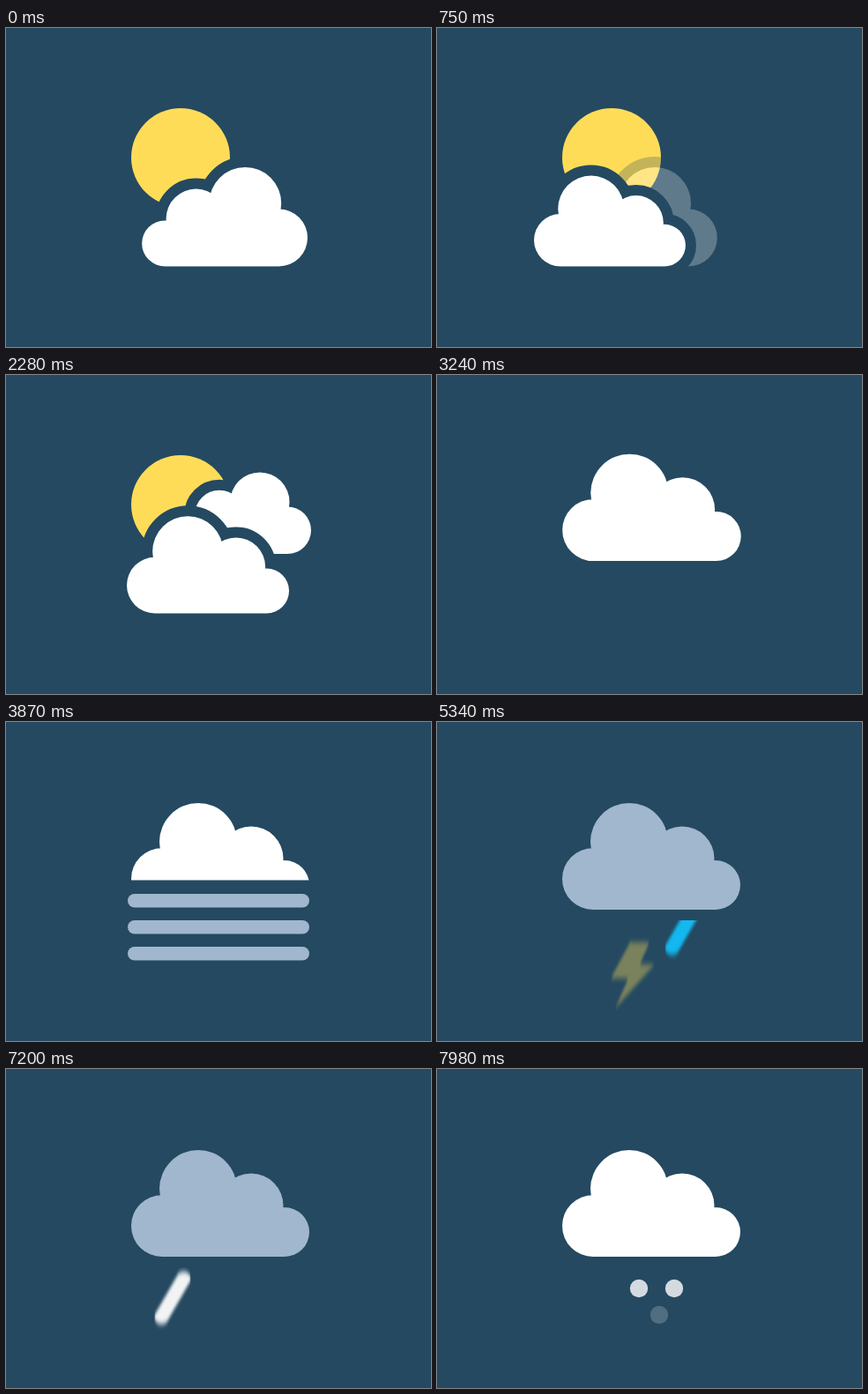
Write an HTML page that moves like this. It is 482x362 px and loops after 8000 ms.

```html
<!DOCTYPE html>
<html lang="en">
<head>
<meta charset="utf-8">
<title>Weather icons</title>
<style>
  html, body { margin: 0; width: 100%; height: 100%; overflow: hidden; background: #244961; }
  svg { display: block; width: 482px; height: 362px; }
  .cloud { fill: #fff; stroke: #244961; stroke-width: 24; paint-order: stroke; vector-effect: non-scaling-stroke; }
</style>
</head>
<body>
<svg id="stage" viewBox="0 0 482 362">
  <filter id="smear" filterUnits="userSpaceOnUse" x="-60" y="-90" width="600" height="540" color-interpolation-filters="sRGB">
    <feGaussianBlur stdDeviation="0 3"/>
  </filter>
</svg>
<script>
const LOOP = 8000;
const BG = '#244961', SUN = '#ffdc58', RAIN = '#14b8f0', FOG = '#a0b7cd';
const stage = document.getElementById('stage');

function set(el, attrs) {
  for (const k in attrs) el.setAttribute(k, attrs[k]);
  return el;
}
function add(tag, attrs) {
  return stage.appendChild(set(document.createElementNS('http://www.w3.org/2000/svg', tag), attrs));
}

// The cloud's origin is its lower left corner; it is 202 wide.
const puff = (x, y, r) => `M${x - r} ${y}a${r} ${r} 0 0 1 ${2 * r} 0a${r} ${r} 0 0 1 ${-2 * r} 0z`;
const CLOUD = puff(35, -35, 35) + puff(76, -77, 44) + puff(136, -58, 36.5) +
  puff(174, -28, 28) + 'M35-53H174V0H35z';
const addCloud = () => add('path', { d: CLOUD, class: 'cloud' });

// Drawing order, back to front
const sun = add('circle', { cx: 198, cy: 147, fill: SUN });
const first = addCloud();
const back = addCloud();
const bolt = add('path', { d: 'M219 231H241L230 256H247L202 306L217 272H197z', fill: SUN });

// Three slanted strokes per shower, entering from right to left
const shower = (color, start, gap, out, outGap, outTime) => [0, 1, 2].map(i => ({
  el: add('path', {
    d: `M${278.5 - 38 * i} 236l-25 43.5`, stroke: color, 'stroke-width': 16, 'stroke-linecap': 'round'
  }),
  start: start + gap * i, out: out + outGap * i, outTime
}));
const drops = [
  ...shower(RAIN, 5290, 220, 5940, 60, 180),
  ...shower('#fff', 6060, 120, 6630, 250, 280)
];

const front = addCloud();
const cover = add('rect', { x: 130, width: 225, fill: BG });
const bars = [0, 1, 2].map(i => add('rect', { x: 138, y: 195 + 30 * i, height: 15.5, rx: 7.75, fill: FOG }));
const flakes = [[229, 249, 7620], [269, 249, 7620], [252, 279, 7890]].map(([cx, cy, start]) =>
  ({ el: add('circle', { cx, cy, r: 10.2, fill: '#fff' }), start }));

const part = (t, start, time) => Math.min(1, Math.max(0, (t - start) / time));
const mix = (a, b, p) => a + (b - a) * p;
const easeIn = p => p * p;
const easeOut = p => 1 - (1 - p) ** 3;
const smooth = p => p * p * (3 - 2 * p);
const backOut = p => 1 + 3.2 * (p - 1) ** 3 + 2.2 * (p - 1) ** 2;

function place(el, x, y, scale, flip, opacity) {
  set(el, { transform: `translate(${x} ${y}) scale(${flip ? -scale : scale} ${scale})`, opacity });
}
function move(el, x, y, opacity, blurred) {
  set(el, { transform: `translate(${x} ${y})`, opacity, filter: blurred ? 'url(#smear)' : 'none' });
}

function drawClouds(t) {
  const gone = t - 630;
  place(first, 342 - Math.max(0, gone) * 0.2, 270.5, 0.93, true, 1 - part(t, 630, 165));

  // Drift in from the left, overshoot, settle
  let x = mix(88, 110, easeIn(part(t, 630, 120)));
  x += 74 * smooth(part(t, 750, 240)) - 32 * smooth(part(t, 990, 240));
  const grow = smooth(part(t, 1500, 330));
  const rise = backOut(part(t, 3120, 360));
  x = mix(mix(x, 137, grow), 142, rise);
  place(front, x, mix(270.5, 213, rise), mix(mix(0.851, 0.911, grow), 1, rise), false, part(t, 630, 90));

  const grey = part(t, 4380, 240) - part(t, 7440, 240);
  front.style.fill = `rgb(${mix(255, 160, grey)},${mix(255, 183, grey)},${mix(255, 205, grey)})`;

  const show = easeOut(part(t, 1500, 330));
  place(back, mix(316, 346, show), 203, 0.765, true, show * (1 - part(t, 3120, 210)));
}

function drawSun(t) {
  const swell = smooth(part(t, 2280, 210)), shrink = easeIn(part(t, 2490, 360));
  set(sun, { r: 56 * (1 + 0.2 * swell) * (1 - shrink) });
}

function drawFog(t) {
  const cut = 33.5 * (smooth(part(t, 3390, 210)) - smooth(part(t, 4380, 180)));
  set(cover, { y: 213 - cut, height: cut ? cut + 12 : 0 });
  bars.forEach((bar, i) => set(bar, {
    width: 206 * easeOut(part(t, 3390 + 120 * i, 240)),
    opacity: 1 - part(t, 4380 + 60 * i, 180)
  }));
}

function drawFall(t) {
  const enter = part(t, 4560, 270), leave = easeIn(part(t, 5130, 270));
  move(bolt, 0, -82 * (1 - easeOut(enter)) + 31 * leave, enter ? 1 - leave : 0,
    enter < 0.6 || leave > 0);

  for (const { el, start, out, outTime } of drops) {
    const p = part(t, start, 180), up = 1 - easeOut(p), q = easeIn(part(t, out, outTime));
    move(el, 36 * up - 17 * q, -63 * up + 31 * q, p ? 1 - q : 0, p < 0.6 || q > 0);
  }
  for (const { el, start } of flakes) set(el, { opacity: part(t, start, 450) });
}

function frame(now) {
  const t = now % LOOP;
  drawSun(t);
  drawClouds(t);
  drawFog(t);
  drawFall(t);
  requestAnimationFrame(frame);
}
frame(0);
</script>
</body>
</html>
```
